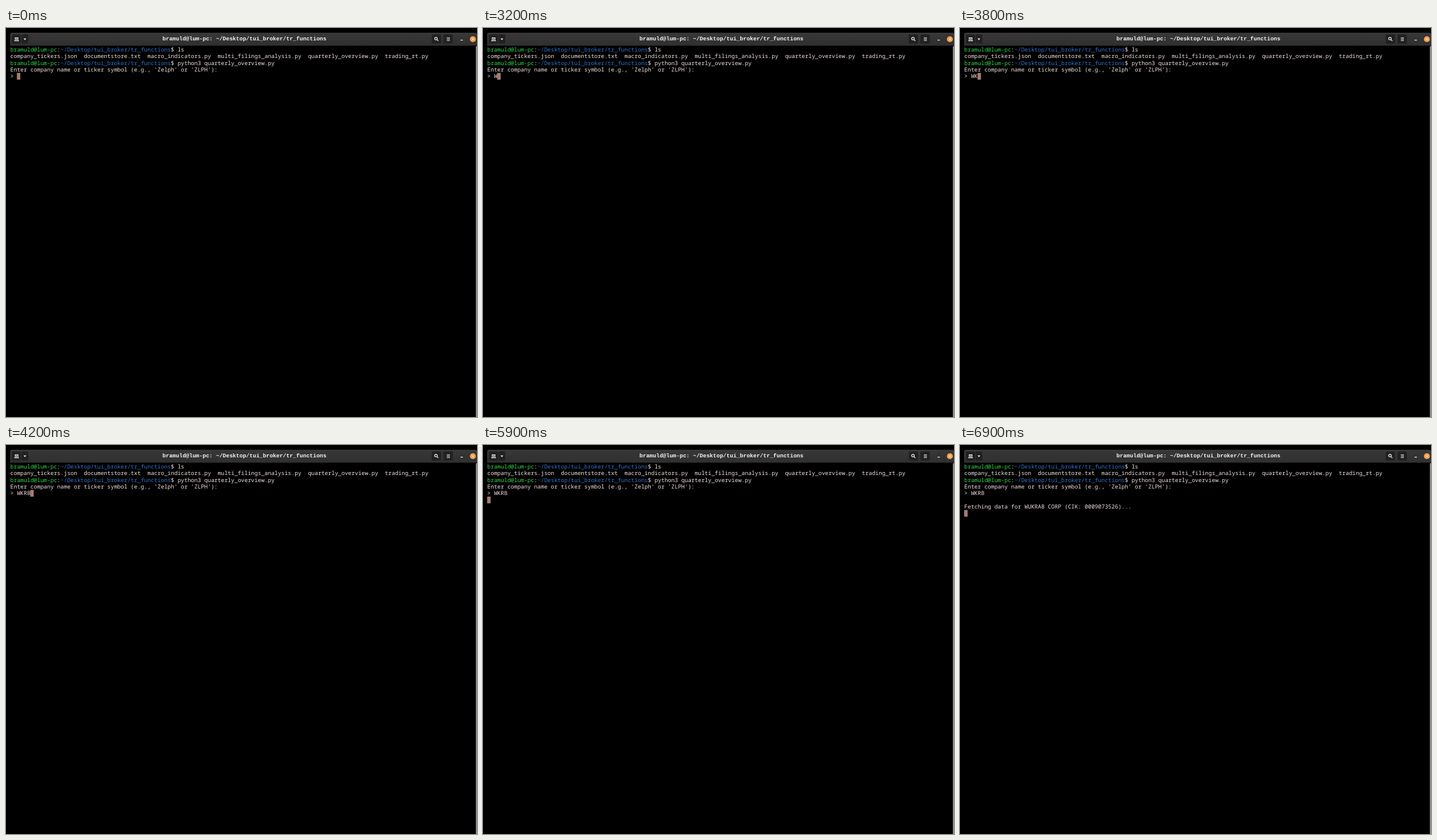
Animation, 800 px wide and 661 px high, one loop 8000 ms. Source, as an HTML page:

```html
<!DOCTYPE html>
<html lang="en">
<head>
<meta charset="utf-8">
<title>Terminal</title>
<style>
html, body { margin: 0; width: 100%; height: 100%; overflow: hidden; background: #000; }
svg { display: block; width: 800px; height: 661px; }
text { white-space: pre; text-rendering: geometricPrecision; fill: #f0e0de;
  font: 9.475px "Noto Sans Mono", monospace; }
.title { font: bold 9.48px "Liberation Mono", monospace; fill: #f4f4f4; }
.user { fill: #2fd648; font-weight: 500; }
.path { fill: #2f74d0; font-weight: 500; }
.icon { fill: none; stroke: #f2f2f2; stroke-width: 1.2; }
</style>
</head>
<body>
<svg viewBox="0 0 800 661">
  <defs>
    <linearGradient id="bar" x2="0" y2="1">
      <stop stop-color="#393737"/>
      <stop offset="1" stop-color="#302f2f"/>
    </linearGradient>
  </defs>
  <rect width="800" height="661"/>
  <path d="M7 30V11q0-3 3-3H797q3 0 3 3V30Z" fill="url(#bar)"/>
  <rect x="798" y="31" width="2" height="630" fill="#8a8a8a"/>
  <g fill="#222121">
    <rect x="10" y="11" width="15.5" height="15.5" rx="2"/>
    <rect x="26.5" y="11" width="11.5" height="15.5" rx="2"/>
    <rect x="723" y="11" width="16" height="15.5" rx="2"/>
    <rect x="743" y="11" width="16" height="15.5" rx="2"/>
  </g>
  <g class="icon">
    <path d="M15.6 20.5V16.5H20.4V20.5M14 21.6H22M18 17.6V20.4M16.8 19H19.2"/>
    <circle cx="730.3" cy="18" r="2.2"/>
    <path d="M732 19.7L734.3 22"/>
    <path d="M748.7 16.7H754M748.7 19H754M748.7 21.3H754" stroke-width="1"/>
    <path d="M772 20.6H776"/>
  </g>
  <path d="M29.7 17.8H34.5L32.1 20.4Z" fill="#f2f2f2"/>
  <circle cx="793" cy="19" r="5.1" fill="#f4a04f"/>
  <path d="M791.2 17.2L794.8 20.8M794.8 17.2L791.2 20.8" stroke="#fbe6d0"/>
  <text class="title" x="265.8" y="21">bramuld@lum-pc: ~/Desktop/tui_broker/tr_functions</text>
  <g id="screen"></g>
  <rect id="cursor" width="5.8" height="11.4"/>
</svg>
<script>
const LOOP = 8000, LEFT = 7.3, TOP = 30.95, CELL = 5.685, ROW = 11.35;
const screen = document.getElementById("screen");
const cursor = document.getElementById("cursor");

function addLine(row, html) {
  const line = document.createElementNS("http://www.w3.org/2000/svg", "text");
  line.setAttribute("x", LEFT);
  line.setAttribute("y", TOP + row * ROW + 9);
  line.innerHTML = html;
  screen.append(line);
  return line;
}

const prompt = '<tspan class="user">bramuld@lum-pc</tspan>:' +
  '<tspan class="path">~/Desktop/tui_broker/tr_functions</tspan>$ ';

addLine(0, prompt + "ls");
addLine(1, "company_tickers.json  documentstore.txt  macro_indicators.py  " +
  "multi_filings_analysis.py  quarterly_overview.py  trading_rt.py");
addLine(2, prompt + "python3 quarterly_overview.py");
addLine(3, "Enter company name or ticker symbol (e.g., 'Zelph' or 'ZLPH'):");
const entry = addLine(4, "");
const reply = addLine(6, "Fetching data for WUKRAB CORP (CIK: 0009073526)...");

// Start time and typed text, including one corrected slip
const typing = [[0, ""], [3200, "W"], [3400, "WKU"], [3800, "WK"], [4100, "WKR"], [4200, "WKRB"]];

function draw(now) {
  const t = now % LOOP;
  const input = typing.findLast(([start]) => t >= start)[1];
  const row = t < 4900 ? 4 : t < 6800 ? 5 : 7;
  const col = row === 4 ? 2 + input.length : 0;

  entry.textContent = "> " + input;
  reply.style.display = row === 7 ? "" : "none";
  cursor.setAttribute("x", LEFT + col * CELL - 0.2);
  cursor.setAttribute("y", TOP + row * ROW);
  cursor.setAttribute("fill", t >= 4900 && t < 5000 ? "#b8734c" : "#a87c72");
  requestAnimationFrame(draw);
}
draw(0);
</script>
</body>
</html>
```
